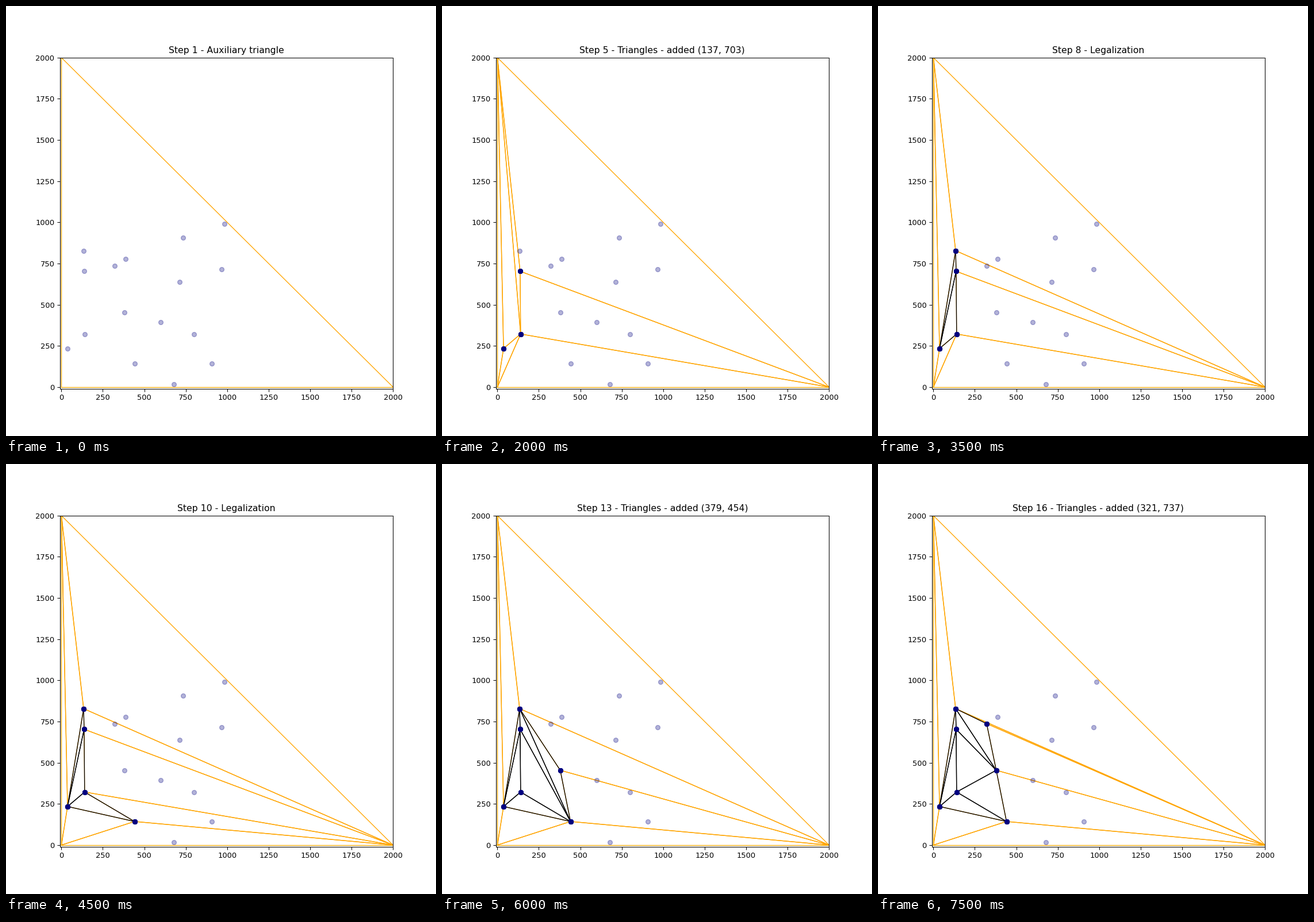
A matplotlib script for the animation above (8 s loop, 748 px wide and 748 px high).

```python
from itertools import combinations, islice

import matplotlib.pyplot as plt
import numpy as np
from matplotlib.animation import FuncAnimation

SIZE, INCHES = 748, 8
FRAMES, STEP_MS = 16, 500
SPAN = 2000

AUX = [(0, 0), (SPAN, 0), (0, SPAN)]
POINTS = [(37, 234), (140, 322), (137, 703), (134, 828), (441, 143),
          (379, 454), (321, 737), (386, 776), (600, 394), (678, 18),
          (801, 319), (908, 143), (967, 714), (714, 638), (733, 906),
          (983, 991)]
VERTS = np.array(AUX + POINTS, dtype=float)
SITES = range(len(AUX), len(VERTS))


def triangle(*corners):
    return tuple(sorted(corners))


def contains(tri, p):
    a, b, c = VERTS[list(tri)]
    u, v = np.linalg.solve(np.column_stack([b - a, c - a]), VERTS[p] - a)
    return u > 0 and v > 0 and u + v < 1


def in_circle(tri, p):
    a, b, c = VERTS[list(tri)]
    sides = np.array([b - a, c - a])
    center = np.linalg.solve(2 * sides, (sides ** 2).sum(axis=1))
    return np.hypot(*(VERTS[p] - a - center)) < np.hypot(*center)


def legalize(tris, edge, p):
    """Flip the edge facing p if needed, yielding after every flip."""
    a, b = edge
    facing = [t for t in tris if a in t and b in t and p not in t]
    if not facing or not in_circle(facing[0], p):
        return
    q = next(v for v in facing[0] if v not in edge)
    tris -= {facing[0], triangle(a, b, p)}
    tris |= {triangle(a, p, q), triangle(b, p, q)}
    yield "Legalization", sorted(tris)
    for v in edge:
        yield from legalize(tris, (v, q), p)


def triangulate():
    tris = {(0, 1, 2)}
    yield "Auxiliary triangle", sorted(tris)
    for p in SITES:
        hit = next(t for t in tris if contains(t, p))
        edges = list(combinations(hit, 2))
        tris.remove(hit)
        tris.update(triangle(a, b, p) for a, b in edges)
        yield "Triangles - added (%d, %d)" % tuple(VERTS[p]), sorted(tris)
        for edge in edges:
            yield from legalize(tris, edge, p)


STEPS = list(islice(triangulate(), FRAMES))

fig, ax = plt.subplots(figsize=(INCHES, INCHES), dpi=SIZE / INCHES)


def draw(i):
    label, tris = STEPS[i]
    ax.clear()
    ax.set_xlim(-10, SPAN)
    ax.set_ylim(-10, SPAN)
    ax.set_title(f"Step {i + 1} - {label}")

    used = set()
    for tri in tris:
        used.update(tri)
        outer = tri[0] < len(AUX)
        for edge in combinations(tri, 2):
            ax.plot(*VERTS[list(edge)].T, lw=1,
                    color="orange" if outer else "black",
                    zorder=2 if outer else 2.1)
        for v in tri:
            if v in SITES:
                ax.plot(*VERTS[v], "o", color="navy", zorder=3)

    waiting = [v for v in SITES if v not in used]
    ax.plot(*VERTS[waiting].T, "o", color="navy", alpha=0.3, zorder=3)
    return []


anim = FuncAnimation(fig, draw, frames=FRAMES, init_func=lambda: [],
                     interval=STEP_MS, repeat=True, repeat_delay=0)
plt.show()
```
